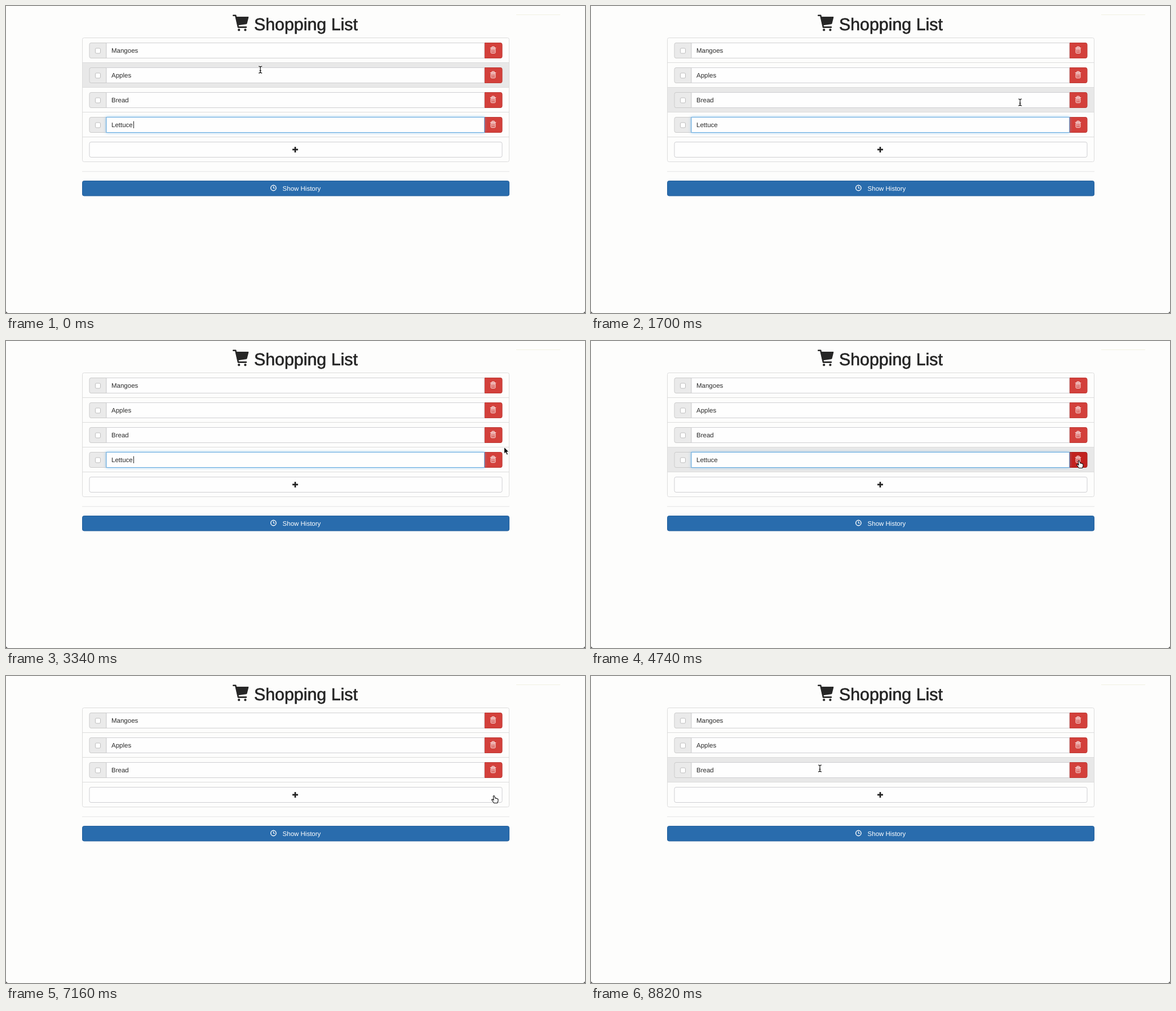
An HTML page for the animation above (8840 ms loop, 1027 by 545 pixels).

```html
<!DOCTYPE html>
<html lang="en">
<head>
<meta charset="utf-8">
<title>Shopping List</title>
<style>
html, body { margin: 0; width: 100%; height: 100%; overflow: hidden; background: #fdfdfc; }
svg { display: block; }
text { font-family: "Liberation Sans", Arial, sans-serif; font-size: 11.5px; fill: #2c2c2c; text-rendering: geometricPrecision; }
.title { font-size: 30.35px; fill: #252525; stroke: #252525; stroke-width: .65px; }
.line { fill: none; stroke: #dcdcdc; }
.field { fill: #fefefe; stroke: #cfcfd2; }
.addon { fill: #eaeaea; stroke: #cbcbcb; }
.box { fill: #fff; stroke: #bdbdbd; }
.del { fill: #d3403b; stroke: #bd3833; }
.del.hot { fill: #c2221f; stroke: #a51c1a; }
.focus { stroke: #63aadf; filter: drop-shadow(0 0 2.5px rgba(102, 175, 233, .65)); }
.can { fill: none; stroke: #fff; stroke-width: 1; }
</style>
</head>
<body>
<svg id="stage" width="1027" height="545" viewBox="0 0 1027 545">
  <path d="M905 15.5H983" stroke="#f2f2e2"/>
  <g fill="#262626">
    <path d="M403.3 16.8H407.3L412 37.6H426" fill="none" stroke="#262626" stroke-width="2.6" stroke-linecap="round" stroke-linejoin="round"/>
    <path d="M407 19H429.5Q430.6 19 430.3 20.2L427.6 31Q427.3 32 426.3 32.2L410.4 34.5Z"/>
    <circle cx="413.2" cy="42.4" r="2.1"/><circle cx="424.4" cy="42.4" r="2.1"/>
  </g>
  <text class="title" x="440" y="43">Shopping List</text>
  <rect id="frame" class="line" x="135.5" y="56.5" width="757" height="220" rx="3"/>
  <g id="rows"></g>
  <g id="foot">
    <rect id="add" class="field" x="148" y="241.5" width="732" height="27" rx="3"/>
    <path d="M508 254.9H518M513 249.9V259.9" stroke="#222" stroke-width="2.7"/>
    <path d="M135 293.8H893" stroke="#e4e4e4"/>
    <rect x="135.5" y="310.5" width="757" height="26.5" rx="3" fill="#296cad" stroke="#235f9b"/>
    <g fill="none" stroke="#fff" stroke-width="1.4">
      <circle cx="474.4" cy="323" r="4.7"/>
      <path d="M474.4 320V323.3H477" stroke-width="1.1"/>
    </g>
    <text x="490.6" y="327.6" style="fill:#fff">Show History</text>
  </g>
  <path d="M0 545V541.5Q.5 544.5 3.5 545ZM1027 545V541.5Q1026.5 544.5 1023.5 545Z" fill="#333"/>
  <g id="pointer">
    <g id="beam" fill="none">
      <path d="M-3 -6Q0 -6 0 -4V4Q0 6 -3 6M3 -6Q0 -6 0 -4M0 4Q0 6 3 6M-1.5 1.5H1.5" stroke="#fff" stroke-width="2.6" opacity=".7"/>
      <path d="M-3 -6Q0 -6 0 -4V4Q0 6 -3 6M3 -6Q0 -6 0 -4M0 4Q0 6 3 6M-1.5 1.5H1.5" stroke="#111" stroke-width="1.2"/>
    </g>
    <path id="arrow" d="M0 0V12L2.8 9.5L4.8 14L7 13L5 8.7H8.6Z" fill="#000" stroke="#fff" stroke-width="1"/>
    <path id="hand" d="M-1.2 .7Q0 -.6 1 .8L2.2 4.5Q3.3 3.6 4 5Q5.2 4.2 5.8 5.6Q7.3 5.2 7.5 7L7.2 10L6 13H0L-2.5 9.5L-4 7.2Q-3.5 5.7 -2 6.8L-.5 8Z" fill="#fff" stroke="#111" stroke-width="1.1" stroke-linejoin="round"/>
  </g>
</svg>
<script>
const LOOP = 8840, REMOVED_AT = 6700, ROW = 44, TOP = 57;
const items = ["Mangoes", "Apples", "Bread", "Lettuce"];
const $ = id => document.getElementById(id);

// time, x, y of the pointer's hot spot
const path = [
  [0, 451, 113], [1700, 761, 171], [3340, 883.5, 188.2],
  [4300, 865.5, 212.5], [7300, 865.5, 212.5], [8820, 406, 164]
];

function rowMarkup(name, i) {
  const last = i === items.length - 1;
  return `<g transform="translate(0 ${i * ROW})">
    <rect class="bg" x="136" y="57" width="756" height="43.5" fill="#e8e8e8"/>
    <path class="line" d="M136 100.5H892"/>
    <path class="addon" d="M178 65.5H151Q148 65.5 148 68.5V89.5Q148 92.5 151 92.5H178Z"/>
    <rect class="box" x="158.5" y="75" width="9" height="9" rx="2"/>
    <path class="del" d="M848.5 65.5H877Q880 65.5 880 68.5V89.5Q880 92.5 877 92.5H848.5Z"/>
    <rect class="field${last ? " focus" : ""}" x="178" y="65.5" width="670.5" height="27"/>
    <path class="can" d="M858.8 74.5H869.2M862 74V72.3H866V74M860.2 76V82.5Q860.2 83.7 861.4 83.7H866.6Q867.8 83.7 867.8 82.5V76M862.7 76.5V82M865.3 76.5V82M860 76.2H868"/>
    <text x="187" y="82.6">${name}</text>
    ${last ? '<path id="caret" d="M226.5 72.5V85" stroke="#222"/>' : ""}
  </g>`;
}
$("rows").innerHTML = items.map(rowMarkup).join("");
const rows = [...$("rows").children].map(el => ({
  el, bg: el.querySelector(".bg"), del: el.querySelector(".del")
}));

function pointAt(t) {
  const n = path.findIndex(p => p[0] > t);
  if (n < 0) return path[path.length - 1].slice(1);
  const [a, b] = [path[n - 1], path[n]];
  const k = (t - a[0]) / (b[0] - a[0]);
  return [1, 2].map(j => a[j] + (b[j] - a[j]) * k);
}

const show = (el, on) => el.setAttribute("visibility", on ? "inherit" : "hidden");

function draw(t) {
  const removed = t >= REMOVED_AT;
  const count = removed ? 3 : 4;
  const [x, y] = pointAt(t);
  const slot = Math.floor((y - TOP) / ROW);
  const off = (y - TOP) % ROW;
  const inControl = off >= 8 && off <= 36 && x >= 148 && x <= 880;
  const onRow = slot < count && off < 43 && x > 135 && x < 892;
  const onDel = onRow && inControl && x >= 848;
  const onAdd = slot === count && inControl;
  const onText = onRow && inControl && x > 178 && !onDel;

  rows.forEach((r, i) => {
    show(r.el, i < count);
    show(r.bg, onRow && i === slot);
    r.del.classList.toggle("hot", onDel && i === slot);
  });
  show($("caret"), !removed && t % 1000 < 500);
  $("frame").setAttribute("height", (count + 1) * ROW);
  $("foot").setAttribute("transform", `translate(0 ${(count - 4) * ROW})`);
  $("add").style.fill = onAdd && t > path[4][0] ? "#e8e8e8" : "";

  $("pointer").setAttribute("transform", `translate(${x} ${y})`);
  show($("beam"), onText);
  show($("hand"), onDel || onAdd);
  show($("arrow"), !onText && !onDel && !onAdd);
}

const start = performance.now();
function tick() {
  draw((performance.now() - start) % LOOP);
  requestAnimationFrame(tick);
}
tick();
</script>
</body>
</html>
```
